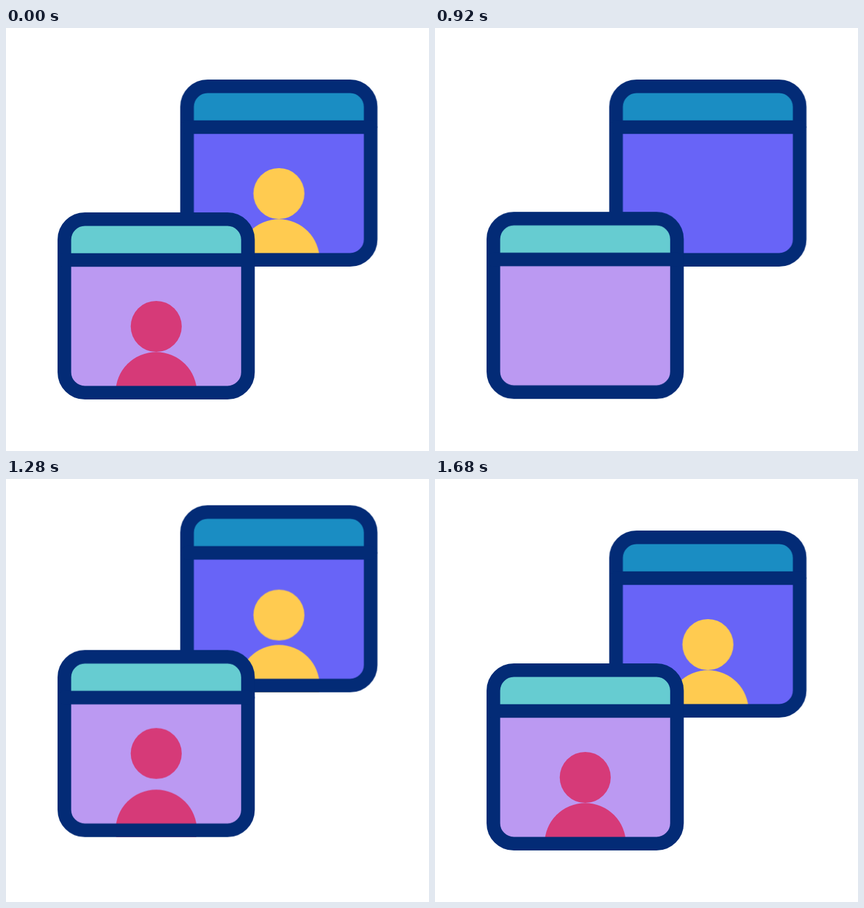
An HTML page without scripts that plays this animation: 640x640 px, repeating every 2 s.

```html
<!DOCTYPE html>
<html lang="en">
<head>
<meta charset="utf-8">
<title>Video call windows</title>
<style>
  html, body { margin: 0; width: 100%; height: 100%; overflow: hidden; background: #fff; }
  svg { display: block; width: 100vw; height: 100vh; }

  .frame { fill: none; stroke: #032b76; stroke-width: 20.6; stroke-linecap: round; }
  .back { --header: #1a8dc3; --pane: #6864f7; --skin: #ffcb50; --delay: 160ms; }
  .front { --header: #66ccd1; --pane: #bb99f2; --skin: #d63a78; --delay: 0ms; }
  .header { fill: var(--header); }
  .pane { fill: var(--pane); }
  .person { fill: var(--skin); }

  .window, .person, .head { animation: 2s var(--delay) infinite; }
  .window { animation-name: hop; }
  .person { animation-name: duck; }
  .head { animation-name: nod; }

  @keyframes hop {
    0%, 44% { transform: none; animation-timing-function: cubic-bezier(.75, 0, .36, 1); }
    56% { transform: translateY(-38.3px); animation-timing-function: cubic-bezier(.62, 0, .14, 1); }
    76%, 100% { transform: none; }
  }
  @keyframes duck {
    0%, 6% { transform: none; animation-timing-function: cubic-bezier(.85, 0, 1, 1); }
    34%, 44% { transform: translateY(199px); animation-timing-function: cubic-bezier(.75, 0, .34, 1); }
    56%, 100% { transform: none; }
  }
  @keyframes nod {
    0%, 50% { transform: none; animation-timing-function: cubic-bezier(.333, 0, .667, 1); }
    64% { transform: translateY(-16px); animation-timing-function: cubic-bezier(.33, 0, .21, 1); }
    76%, 100% { transform: none; }
  }
</style>
</head>
<body>
<svg viewBox="0 0 640 640">
  <defs>
    <clipPath id="bounds"><rect x="78" y="279" width="298.4" height="283" rx="41.3"/></clipPath>
    <rect id="box" x="88.3" y="289.3" width="277.8" height="262.4" rx="31"/>
    <path id="bar" d="M88.3 351V320.3a31 31 0 0 1 31-31H335.1a31 31 0 0 1 31 31V351z"/>
    <g id="border" class="frame">
      <use href="#box"/>
      <path d="M88.3 351H366.1"/>
    </g>
  </defs>

  <g class="back" transform="translate(185.6 -201)">
    <g class="window">
      <use href="#box" class="pane"/>
      <use href="#bar" class="header"/>
      <g clip-path="url(#bounds)">
        <g class="person">
          <circle class="head" cx="227.3" cy="451.5" r="38.6"/>
          <circle cx="227.3" cy="551.7" r="61.5"/>
        </g>
      </g>
      <use href="#border"/>
    </g>
  </g>

  <g class="front">
    <g class="window">
      <use href="#box" class="pane"/>
      <use href="#bar" class="header"/>
      <g clip-path="url(#bounds)">
        <g class="person">
          <circle class="head" cx="227.3" cy="451.5" r="38.6"/>
          <circle cx="227.3" cy="551.7" r="61.5"/>
        </g>
      </g>
      <use href="#border"/>
    </g>
  </g>
</svg>
</body>
</html>
```
